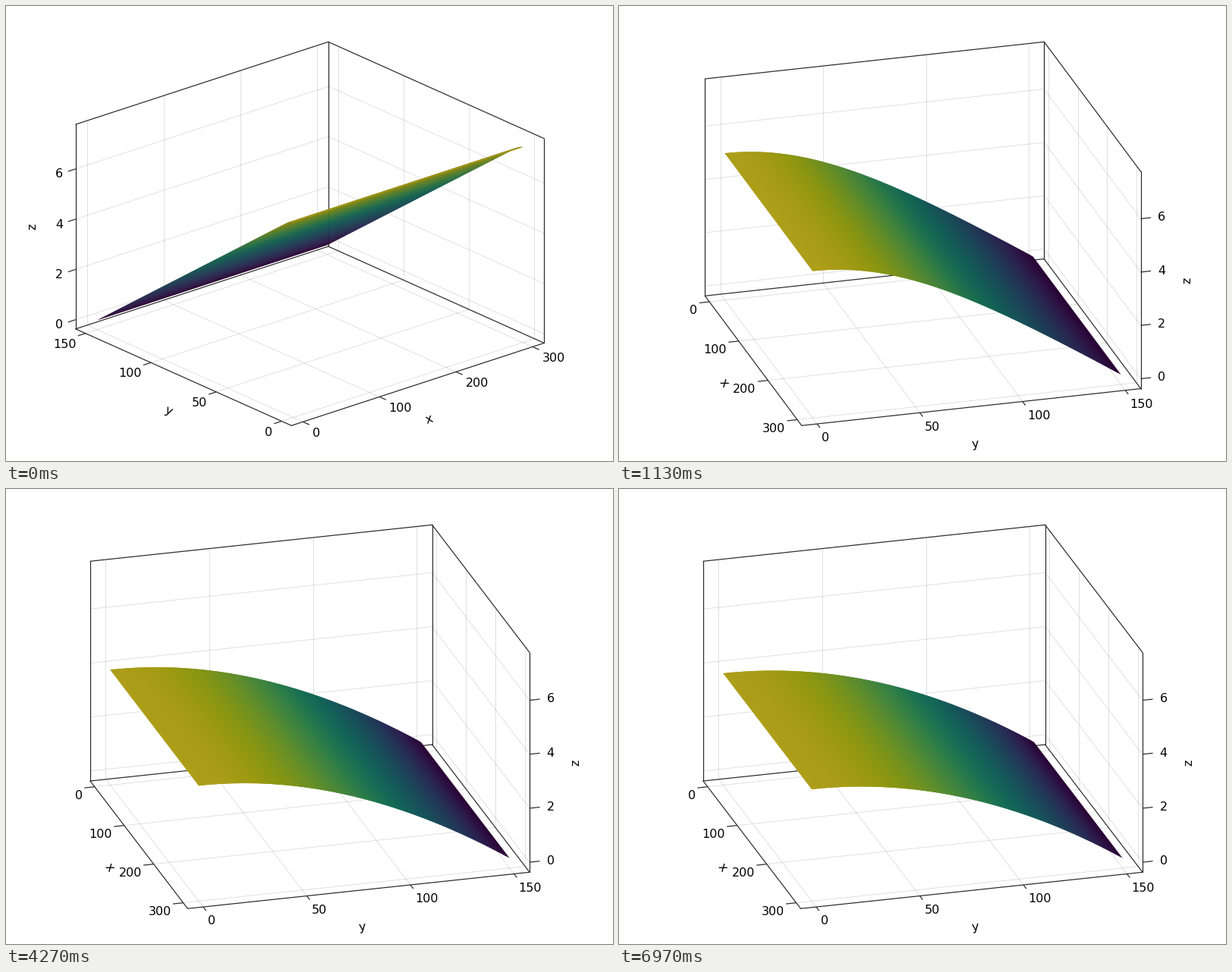
Animation, 800 px wide and 600 px high, one loop 7.01 s. Source, as a matplotlib script:

```python
import numpy as np
import matplotlib
import matplotlib.pyplot as plt
from matplotlib.animation import FuncAnimation
from matplotlib.collections import LineCollection, PolyCollection

FRAMES, LOOP_MS = 213, 7010
PX = 0.72  # points per pixel at 100 dpi
CX, CY, HEIGHT = 400.5, 300.3, 506
Z_ASPECT = 2 / 3
DATA_MAX = np.array([300, 150, 7.4])
TICKS = [(0, 100, 200, 300), (0, 50, 100, 150), (0, 2, 4, 6)]
RATE, T0, SLOPE = 0.023, 0.06, 7.5

plt.rcParams["font.family"] = "DejaVu Sans"
fig = plt.figure(figsize=(8, 6), dpi=100, facecolor="white")
ax = fig.add_axes([0, 0, 1, 1])
ax.set_xlim(0, 800)
ax.set_ylim(600, 0)
ax.axis("off")

grid = LineCollection([], colors=[(0, 0, 0, 0.12)], linewidths=PX, zorder=1)
spines = LineCollection([], colors="#282828", linewidths=1.2 * PX,
                        capstyle="round", zorder=2)
ticks = LineCollection([], colors="#282828", linewidths=1.2 * PX, zorder=2)
sheet = PolyCollection([], linewidths=0, edgecolors="none", zorder=3)
for c in (grid, spines, ticks, sheet):
    ax.add_collection(c, autolim=False)

FONT = dict(fontsize=16 * PX, color="black", zorder=4)
tick_text = [[ax.text(0, 0, str(v), va="baseline", **FONT) for v in vals]
             for vals in TICKS]
name_text = [ax.text(0, 0, n, ha="center", va="center", **FONT) for n in "xyz"]

viridis = matplotlib.colormaps["viridis"]
s = np.linspace(0, 1, 121)
modes = np.arange(1, 81)[:, None]
waves = 2 / (modes * np.pi) ** 2 * (np.cos(modes * np.pi * s) - (-1.0) ** modes)


def unit(value, dim):
    """Data value to box coordinate in -0.5..0.5, with a 5% margin."""
    return (value / DATA_MAX[dim] + 0.05) / 1.1 - 0.5


def profile(n):
    """Diffusing slope: zero at one edge, constant at the other."""
    decay = np.exp(-modes ** 2 * RATE * (n + T0))
    return SLOPE * ((1 - s ** 2) / 2 + (waves * decay).sum(axis=0))


def camera(n):
    """Azimuth and elevation during the drag that swings the box round."""
    p = np.clip((n - 6) / 27.8, 0, 1)
    g = (1 - np.cos(np.pi * p)) / 2
    az = 1.275 * np.pi + 2 * g
    el = np.pi / 8 + 0.425 * np.sin(np.pi * g) - (0.01 if n > 34 else 0)
    return az, el


def projector(az, el):
    sa, ca, se, ce = np.sin(az), np.cos(az), np.sin(el), np.cos(el)
    size = HEIGHT / (se * (abs(sa) + abs(ca)) + ce * Z_ASPECT)

    def project(u, v, w):
        right = -sa * u + ca * v
        up = -se * (ca * u + sa * v) + ce * Z_ASPECT * w
        return np.stack(np.broadcast_arrays(CX + size * right,
                                            CY - size * up), axis=-1)
    return project


def draw_sheet(n, project, az, el):
    z = profile(n)
    v, w = unit(150 * s, 1), unit(z, 2)
    a = project(unit(0, 0), v, w)
    b = project(unit(300, 0), v, w)
    # each strip reaches under its nearer neighbour, so no seams show
    near = np.maximum(np.arange(len(s) - 1) - 1, 0)
    quads = np.stack([a[near], b[near], b[1:], a[1:]], axis=1)

    fall = -np.diff(w) * Z_ASPECT / np.diff(v)
    norm = np.hypot(fall, 1)
    facing = (fall * np.cos(el) * np.sin(az) + np.sin(el)) / norm
    shade = np.minimum(0.16 + 0.53 / norm, 0.57 + 0.3 * facing.clip(0))
    mid = (z[:-1] + z[1:]) / 2
    colors = viridis(mid / z.max())
    colors[:, :3] *= shade[:, None]

    # far strips first
    sheet.set_verts(quads[::-1])
    sheet.set_facecolor(colors[::-1])


def draw_box(project, az):
    h = 0.5
    bx = h if np.cos(az) < 0 else -h  # back wall in x
    fx = -bx

    def seg(p, q):
        return np.array([project(*p), project(*q)])

    lines = []
    for x in TICKS[0]:
        u = unit(x, 0)
        lines += [seg((u, -h, -h), (u, h, -h)), seg((u, h, -h), (u, h, h))]
    for y in TICKS[1]:
        v = unit(y, 1)
        lines += [seg((-h, v, -h), (h, v, -h)), seg((bx, v, -h), (bx, v, h))]
    for z in TICKS[2]:
        w = unit(z, 2)
        lines += [seg((-h, h, w), (h, h, w)), seg((bx, -h, w), (bx, h, w))]
    grid.set_segments(lines)

    edges = [((-h, -h, -h), (h, -h, -h)), ((-h, h, -h), (h, h, -h)),
             ((-h, -h, -h), (-h, h, -h)), ((h, -h, -h), (h, h, -h)),
             ((bx, h, -h), (bx, h, h)), ((fx, h, -h), (fx, h, h)),
             ((bx, -h, -h), (bx, -h, h)),
             ((-h, h, h), (h, h, h)), ((bx, -h, h), (bx, h, h))]
    spines.set_segments([seg(*e) for e in edges])
    return fx


def draw_axes(project, fx):
    h = 0.5
    origin = project(0, 0, 0)
    ex = project(1, 0, 0) - origin
    ey = project(0, 1, 0) - origin
    out_x = ex * np.sign(fx)
    # z ticks follow whichever floor direction is wider on screen
    out_z = out_x if abs(ex[0]) > abs(ey[0]) else ey
    axes = [(lambda t: (t, -h, -h), -ey),
            (lambda t: (fx, t, -h), out_x),
            (lambda t: (fx, h, t), out_z)]

    segs = []
    for dim, (at, out) in enumerate(axes):
        d = out / np.hypot(*out)
        for value, label in zip(TICKS[dim], tick_text[dim]):
            p = project(*at(unit(value, dim)))
            tip = p + 0.03 * out
            segs.append(np.array([p, tip]))
            pad = 10 if dim == 2 else 5
            drop = 5.3 if dim == 2 else 14.2
            nudge = -0.8 if d[0] > 0 else 2.7
            label.set_ha("left" if d[0] > 0 else "right")
            label.set_position((tip[0] + pad * d[0] + nudge,
                                tip[1] + pad * d[1] + drop))

        p, q = project(*at(-h)), project(*at(h))
        mid, along = (p + q) / 2, q - p
        name = name_text[dim]
        if dim == 2:
            name.set_position((mid[0] + 59 * np.sign(d[0]) + 2, mid[1]))
            name.set_rotation(90)
            continue
        if along[0] < 0:
            along = -along
        along = along / np.hypot(*along)
        name.set_position(mid + 49 * np.array([-along[1], along[0]])
                          * np.sign(-along[1] * d[0] + along[0] * d[1]))
        name.set_rotation(np.degrees(np.arctan2(-along[1], along[0])))
    ticks.set_segments(segs)


def update(n):
    az, el = camera(n)
    project = projector(az, el)
    fx = draw_box(project, az)
    draw_axes(project, fx)
    draw_sheet(n, project, az, el)
    return []


anim = FuncAnimation(fig, update, frames=FRAMES, interval=LOOP_MS / FRAMES,
                     repeat=True, repeat_delay=0, blit=False)
plt.show()
```
